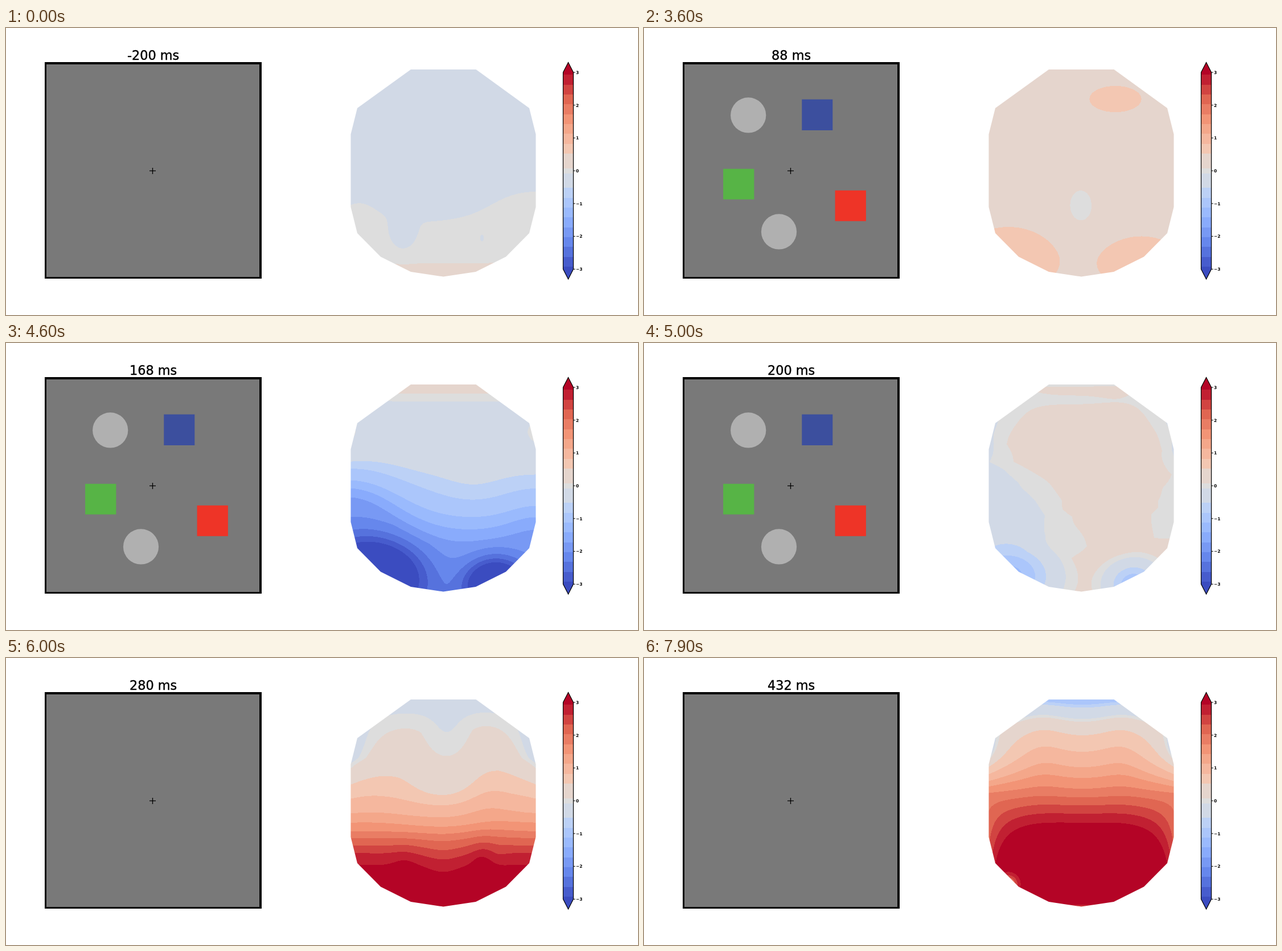
An HTML page with a canvas for the animation above (8 s loop, 1110 px wide and 505 px high).

```html
<!DOCTYPE html>
<html lang="en">
<head>
<meta charset="utf-8">
<title>Evoked response map</title>
<style>
html, body { margin: 0; width: 100%; height: 100%; overflow: hidden; background: #fff; }
svg { position: absolute; left: 0; top: 0; }
text { font-family: "DejaVu Sans", sans-serif; }
#map {
  position: absolute; left: 605px; top: 72px;
  clip-path: polygon(106px 1px, 220.5px 1px, 314px 69px, 325.5px 115px, 325.5px 243px,
    314px 289px, 273px 330.5px, 220px 357px, 163px 365.5px, 106px 357px, 53px 330.5px,
    12px 289px, .5px 243px, .5px 115px, 12px 69px);
}
</style>
</head>
<body>
<canvas id="map" width="326" height="366"></canvas>
<svg width="1110" height="505" viewBox="0 0 1110 505">
  <rect x="68" y="60" width="381" height="381"/>
  <rect x="71" y="64" width="374" height="374" fill="#797979"/>
  <g id="stimuli">
    <circle cx="183.2" cy="153.4" r="31.1" fill="#b0b0b0"/>
    <circle cx="237" cy="358.4" r="31.1" fill="#b0b0b0"/>
    <rect x="277.3" y="125.6" width="54" height="54.4" fill="#3c4f9e"/>
    <rect x="139.1" y="247.8" width="54.3" height="53.8" fill="#57b446"/>
    <rect x="335.6" y="285.8" width="54.3" height="54" fill="#ee3427"/>
  </g>
  <path d="M252 251.4h11M257.5 246v11" stroke="#000" stroke-width="1.3"/>
  <text id="title" x="258.6" y="55.5" font-size="22.4" text-anchor="middle" stroke="#000" stroke-width=".4"></text>
  <g id="bar"></g>
</svg>
<script>
const W = 326, H = 366, LEFT = 605, TOP = 72, MID = 768;
const LOOP = 8000, STEP = 100;

// Diverging blue-grey-red ramp over -3..3
const RAMP = ["3b4cc0", "6282ea", "8db0fe", "b8d0f9", "dddddd", "f5c4ad", "f49a7b", "de604d", "b40426"]
  .map(h => [0, 2, 4].map(i => parseInt(h.slice(i, i + 2), 16)));

function ramp(v) {
  const u = (v + 3) / 6 * (RAMP.length - 1), i = Math.min(RAMP.length - 2, Math.floor(u));
  return RAMP[i].map((c, k) => Math.round(c + (RAMP[i + 1][k] - c) * (u - i)));
}

// Filled contours: a thin band around zero, a wide one, then even steps
function shade(v) {
  const a = Math.abs(v);
  const mid = a < .075 ? 0 : a < .525 ? .25
    : Math.min(3, .675 + .3 * Math.floor((a - .525) / .3));
  return ramp(Math.sign(v) * mid);
}

// Local hill or dip; a high power gives a flat top
const hill = (cx, cy, rx, ry, height, power = 1) => (x, y) =>
  height * Math.exp(-((((x - cx) / rx) ** 2 + ((y - cy) / ry) ** 2) ** power));

// Bend that acts only near the left and right rim
const rim = amount => (x, y) => ((x - MID) / 163) ** 4 * amount(y);
const rimAt = (cy, ry, height) => rim(y => height * Math.exp(-(((y - cy) / ry) ** 2)));

function profile(stops, y) {
  let i = 0;
  while (i < stops.length && y >= stops[i][0]) i++;
  if (!i) return stops[0][1];
  const [y0, v0] = stops[i - 1];
  if (i === stops.length) return v0;
  const [y1, v1] = stops[i];
  return v0 + (v1 - v0) * (y - y0) / (y1 - y0);
}

// stops: [y, value] from top to bottom; bends move contours down; bumps add to the value
function field({ stops, bends = [], bumps = [] }) {
  const sum = (list, x, y) => list.reduce((s, f) => s + f(x, y), 0);
  return Float32Array.from({ length: W * H }, (_, i) => {
    const x = LEFT + i % W + .5, y = TOP + Math.floor(i / W) + .5;
    return profile(stops, y - sum(bends, x, y)) + sum(bumps, x, y);
  });
}

const rest = field({
  stops: [[100, -.2], [343, -.075], [414, .075], [440, .12]],
  bends: [hill(930, 290, 120, 60, -55), hill(620, 300, 50, 80, -35)],
  bumps: [hill(697, 363, 20, 26, -.24), hill(836, 371, 6, 11, -.09)]
});

const drift = field({
  stops: [[300, .2], [422, .075], [437, .03]],
  bends: [hill(635, 395, 30, 40, -30)]
});

const early = field({
  stops: [[TOP, .3]],
  bumps: [
    hill(640, 410, 101, 72, .45), hill(875, 415, 84, 58, .45),
    hill(828, 125, 85, 43, .3), hill(767, 314, 23, 33, -.3, 4)
  ]
});

const negative = field({
  stops: [[80, .15], [89, .075], [103, -.075], [236, -.525], [266, -.825], [305, -1.125], [360, -1.8], [437, -2.1]],
  bends: [
    rimAt(165, 30, 85), hill(600, 290, 100, 90, -85),
    hill(820, 255, 60, 40, 14), hill(931, 330, 60, 80, -25)
  ],
  bumps: [hill(640, 410, 82, 60, -2.7), hill(860, 425, 48, 42, -2.4)]
});

const positive = field({
  stops: [[60, -.2], [70, -.075], [88, .075], [131, .525], [185, .825], [237, 1.125], [276, 1.425], [304, 1.725], [335, 2.3], [370, 2.95], [437, 3.2]],
  bends: [
    rimAt(170, 70, 115), hill(845, 220, 45, 80, -28), hill(MID, 370, 30, 50, 13),
    hill(700, 355, 25, 30, -11), hill(838, 350, 22, 30, -19)
  ]
});

const split = field({
  stops: [[175, -.4], [188, -.075], [200, .075], [240, .525], [270, .825], [294, 1.425], [319, 2.2], [346, 2.95], [437, 3.4]],
  bends: [hill(MID, 235, 85, 50, 65), hill(MID, 360, 80, 35, 11), hill(862, 365, 18, 25, 14)],
  bumps: [hill(775, 150, 42, 50, -.6)]
});

const late = field({
  stops: [[82, -.85], [88, -.525], [108, -.075], [113, .075], [137, .525], [166, .825], [193, 1.125], [235, 1.8], [270, 2.55], [291, 2.95], [320, 3.15]],
  bends: [
    rimAt(170, 45, 70), rim(y => Math.max(0, .8 * (y - 240))),
    hill(700, 150, 40, 80, -12), hill(840, 150, 40, 80, -12)
  ],
  bumps: [hill(640, 398, 16, 16, -1.4), hill(MID, 440, 45, 5, -1)]
});

const KEYS = [
  [0, rest], [1800, drift], [3600, early], [4600, negative],
  [5500, positive], [6700, split], [7900, late]
];

const LIMIT = 3.2, RES = 200;
const lut = Uint32Array.from({ length: 2 * LIMIT * RES + 1 }, (_, i) => {
  const [r, g, b] = shade((i + .5) / RES - LIMIT);
  return (255 << 24 | b << 16 | g << 8 | r) >>> 0;
});

const byId = id => document.getElementById(id);
const ctx = byId("map").getContext("2d");
const image = ctx.createImageData(W, H);
const pixels = new Uint32Array(image.data.buffer);

function drawMap(t) {
  let i = 0;
  while (i < KEYS.length - 2 && t >= KEYS[i + 1][0]) i++;
  const [t0, a] = KEYS[i], [t1, b] = KEYS[i + 1];
  const p = (t - t0) / (t1 - t0);
  for (let j = 0; j < pixels.length; j++) {
    const v = a[j] + (b[j] - a[j]) * p;
    pixels[j] = lut[Math.floor((Math.max(-3.1, Math.min(3.1, v)) + LIMIT) * RES)];
  }
  ctx.putImageData(image, 0, 0);
}

function drawBar() {
  const y = v => 251.2 - 57.7 * v, top = y(3), bottom = y(-3);
  const fill = v => `fill="rgb(${shade(v)})"`;
  let s = "";
  for (let py = Math.round(top); py < bottom; py++) {
    s += `<rect x="978.5" y="${py}" width="18" height="1" ${fill((251.2 - py - .5) / 57.7)} shape-rendering="crispEdges"/>`;
  }
  s += `<path d="M978.5 ${top}L987.5 60.5L996.5 ${top}z" ${fill(3)}/>`
    + `<path d="M978.5 ${bottom}L987.5 442L996.5 ${bottom}z" ${fill(-3)}/>`
    + `<path d="M978.5 ${top}L987.5 60.5L996.5 ${top}V${bottom}L987.5 442L978.5 ${bottom}z" fill="none" stroke="#000" stroke-width="1.2"/>`;
  for (let v = -3; v <= 3; v++) {
    s += `<path d="M996.5 ${y(v)}h3.2" stroke="#000"/>`
      + `<text x="1001" y="${y(v) + 2.8}" font-size="7.4" font-weight="bold">${v < 0 ? "\u2212" : ""}${Math.abs(v)}</text>`;
  }
  byId("bar").innerHTML = s;
}

let shown = -1;
function update(now) {
  const step = Math.floor(now % LOOP / STEP);
  if (step === shown) return;
  shown = step;
  const ms = -200 + 8 * step;
  byId("title").textContent = ms + " ms";
  byId("stimuli").style.display = ms >= 0 && ms < 250 ? "" : "none";
  drawMap(step * STEP);
}

function frame() {
  update(performance.now());
  requestAnimationFrame(frame);
}

drawBar();
frame();
</script>
</body>
</html>
```
